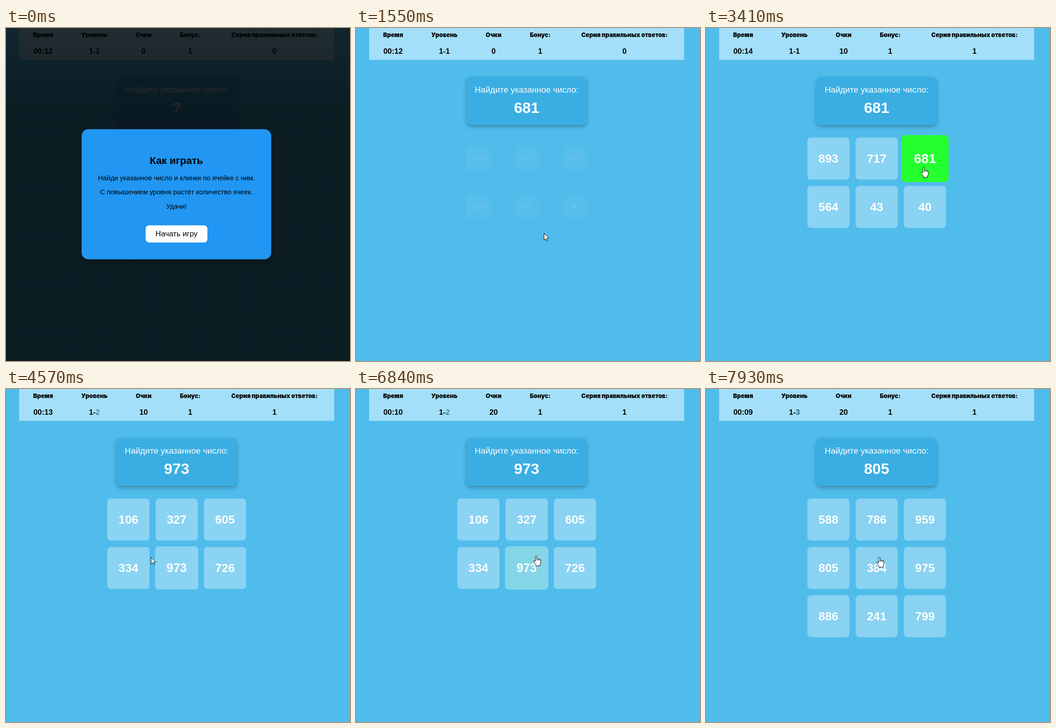
Write an HTML page that moves like this. It is 760 px wide and 737 px high and loops after 8 s.

```html
<!DOCTYPE html>
<html lang="ru">
<head>
<meta charset="utf-8">
<title>Найди число</title>
<style>
  html, body { margin: 0; width: 100%; height: 100%; overflow: hidden; background: #50bceb; }
  svg { display: block; width: 760px; height: 737px; cursor: default; }
  text { font-family: "Liberation Sans", Arial, sans-serif; text-anchor: middle; }
  .b { font-weight: bold; }
  .head { font: 900 13.07px Inter, sans-serif; }
  .value { font-size: 16.8px; }
  .tile { font-size: 26.13px; fill: #fff; }
  .card { filter: drop-shadow(0 4px 5px rgba(0, 0, 0, .28)); }
</style>
</head>
<body>
<svg id="stage" viewBox="0 0 760 737">
  <defs>
    <linearGradient id="shade" x2="0" y2="1">
      <stop offset="0" stop-opacity=".8"/>
      <stop offset=".25" stop-opacity=".85"/>
    </linearGradient>
  </defs>
  <rect width="760" height="737" fill="#50bceb"/>
  <rect x="29" width="696" height="70.5" fill="#a3dff9"/>
  <g id="stats"></g>
  <rect class="card" x="244" y="108" width="265.5" height="106.5" rx="11" fill="#3aaee2"/>
  <text x="376.9" y="143" font-size="18.67" fill="#fff">Найдите указанное число:</text>
  <text id="goal" class="b" x="376.9" y="188" font-size="33.6" fill="#fff"></text>
  <g id="board"></g>
  <g id="modal">
    <rect width="760" height="737" fill="url(#shade)"/>
    <rect class="card" x="167" y="224" width="419" height="288" rx="15" fill="#2196f3"/>
    <text class="b" x="376.5" y="300.5" font-size="22.4">Как играть</text>
    <g font-size="14.93">
      <text x="376.5" y="336.5">Найди указанное число и клинки по ячейке с ним.</text>
      <text x="376.5" y="368">С повышением уровня растёт количество ячеек.</text>
      <text x="376.5" y="399.5">Удачи!</text>
    </g>
    <rect id="button" x="308.5" y="436.7" width="136.5" height="38" rx="7.5" fill="#fff"/>
    <text x="376.8" y="461" font-size="16.8">Начать игру</text>
  </g>
  <g id="cursor" fill="#fff" stroke="#000" stroke-linejoin="round">
    <path id="arrow" d="M.5.5V15.6L4 12.3 6.4 17.6 8.6 16.6 6.3 11.4H10.9Z"/>
    <path id="hand" d="M-1.6 1.8a1.6 1.6 0 0 1 3.2 0V7q1.6-1 3 .4q1.6-.8 2.9.6q2.6-.3 2.6 2V15q0 2.4-1.7 4.2V22.4H-.8V20L-5.4 13.6q-1.2-2.4.8-2.8q1.4 0 3 2.2ZM1.6 7v3.6M4.6 7.4v3.2M7.5 8v2.8"/>
  </g>
</svg>
<script>
const LOOP = 8000, APPEAR = 300, PULSE = 500, HOVER_FADE = 150;
const SVG = 'http://www.w3.org/2000/svg';
const $ = id => document.getElementById(id);

const BASE = [138, 211, 243], GREEN = [38, 255, 47], RED = [255, 58, 52];
const miss = { tile: 5, at: 5450, select: 5560, fade: 5960, clear: 6720 };
const rounds = [
  { start: 1485, click: 2990, answer: 2, ink: '#000', nums: [893, 717, 681, 564, 43, 40] },
  { start: 3840, click: 6805, answer: 4, ink: '#3f87a3', nums: [106, 327, 605, 334, 973, 726] },
  { start: 7645, click: 1e9, answer: 3, ink: '#2b6072', nums: [588, 786, 959, 805, 384, 975, 886, 241, 799] }
];

// time, x, y of the pointer tip
const path = [
  [450, 702, 720], [1150, 415, 454], [1550, 415, 454], [1800, 411, 449], [2340, 411, 449],
  [2850, 481, 308], [4050, 481, 308], [4580, 320, 372], [4830, 320, 372],
  [5400, 459, 357], [5960, 459, 357], [6030, 456, 355], [6600, 398, 369],
  [6860, 398, 369], [7200, 383, 372]
];

const clamp = v => Math.max(0, Math.min(1, v));
const ease = v => (v = clamp(v), v * v * (3 - 2 * v));
const lerp = (a, b, p) => a + (b - a) * p;
const mix = (a, b, p) => `rgb(${a.map((v, i) => Math.round(lerp(v, b[i], p)))})`;

function add(parent, tag, attrs, text) {
  const el = document.createElementNS(SVG, tag);
  for (const k in attrs) el.setAttribute(k, attrs[k]);
  if (text !== undefined) el.textContent = text;
  parent.append(el);
  return el;
}

const [time, level, score, , streak] = [
  ['Время', 82], ['Уровень', 195.3], ['Очки', 304], ['Бонус:', 407], ['Серия правильных ответов:', 593.2]
].map(([label, x]) => {
  add($('stats'), 'text', { class: 'head', x, y: 19.5 }, label);
  return add($('stats'), 'text', { class: 'b value', x, y: 57 }, 1);
});
level.textContent = '1-';
const stage = add(level, 'tspan', {});

for (const r of rounds) {
  r.group = add($('board'), 'g', {});
  r.tiles = r.nums.map((n, i) => {
    const x = 270.4 + i % 3 * 106.7, y = 289 + Math.floor(i / 3) * 107;
    const g = add(r.group, 'g', {});
    const box = add(g, 'rect', { x: -46.6, y: -46.6, width: 93.2, height: 93.2, rx: 8 });
    const mark = add(g, 'rect', { x: -21.8, y: -15, width: 43.6, height: 30, fill: '#2b47ae', visibility: 'hidden' });
    add(g, 'text', { class: 'b tile', y: 9 }, n);
    return { x, y, g, box, mark };
  });
  r.group.append(r.tiles[r.answer].g);
}

function pointer(t) {
  const i = path.findIndex(p => p[0] > t);
  if (i < 0) return path[path.length - 1].slice(1);
  if (i === 0) return path[0].slice(1);
  const [a, b] = [path[i - 1], path[i]], p = ease((t - a[0]) / (b[0] - a[0]));
  return [lerp(a[1], b[1], p), lerp(a[2], b[2], p)];
}

const over = (tile, t) => {
  const [x, y] = pointer(t);
  return Math.abs(x - tile.x) < 46.6 && Math.abs(y - tile.y) < 46.6;
};
const overButton = t => {
  const [x, y] = pointer(t);
  return t > 450 && t < 1280 && x > 308 && x < 445 && y > 437 && y < 475;
};

// share of the recent past spent under the pointer
function hover(r, tile, t) {
  let sum = 0;
  for (let i = 0; i < 10; i++) {
    const s = t - i * HOVER_FADE / 10;
    if (s > r.start + APPEAR && over(tile, s)) sum++;
  }
  return sum / 10;
}

function drawTile(r, i, t) {
  const tile = r.tiles[i], shown = ease((t - r.start) / APPEAR);
  let scale = (0.5 + 0.5 * shown) * (1 + 0.05 * hover(r, tile, t)), fill = mix(BASE, BASE, 0);
  if (i === r.answer && t >= r.click) {
    const p = (t - r.click) / PULSE;
    scale = 1 + 0.5 * ease(p < 0.5 ? p * 2 : 2 - p * 2);
    fill = mix(BASE, GREEN, ease(p * 2));
  }
  if (r === rounds[1] && i === miss.tile) {
    fill = mix(BASE, RED, ease((t - miss.at) / 150) * (1 - ease((t - miss.fade) / 170)));
    tile.mark.setAttribute('visibility', t >= miss.select && t < miss.clear ? 'visible' : 'hidden');
  }
  tile.g.setAttribute('transform', `translate(${tile.x} ${tile.y}) scale(${scale})`);
  tile.g.setAttribute('opacity', shown);
  tile.box.setAttribute('fill', fill);
}

function draw(t) {
  const now = rounds.filter(r => t >= r.start).length - 1;
  const round = rounds[Math.max(0, now)];
  rounds.forEach((r, i) => r.group.setAttribute('display', i === now ? 'inline' : 'none'));
  if (now >= 0) round.tiles.forEach((_, i) => drawTile(round, i, t));

  const left = t < 1690 ? 12 : 16 - Math.floor((t - 690) / 1000);
  time.textContent = '00:' + String(left).padStart(2, '0');
  stage.textContent = Math.max(0, now) + 1;
  stage.setAttribute('fill', round.ink);
  score.textContent = rounds.filter(r => t >= r.click).length * 10;
  streak.textContent = +(t >= rounds[0].click && (t < miss.at || t >= rounds[1].click));
  $('goal').textContent = t < 1280 ? '?' : round.nums[round.answer];

  const gone = ease((t - 1265) / 260);
  $('modal').setAttribute('opacity', 1 - gone);
  $('modal').setAttribute('display', gone < 1 ? 'inline' : 'none');
  $('button').setAttribute('fill', overButton(t) ? '#e6f3fd' : '#fff');

  const [x, y] = pointer(t);
  const hand = overButton(t) || now >= 0 && round.tiles.some(tile => over(tile, t));
  $('cursor').setAttribute('transform', `translate(${x} ${y})`);
  $('cursor').setAttribute('display', t < 450 ? 'none' : 'inline');
  $('arrow').setAttribute('display', hand ? 'none' : 'inline');
  $('hand').setAttribute('display', hand ? 'inline' : 'none');
}

const begin = performance.now();
function tick() {
  draw((performance.now() - begin) % LOOP);
  requestAnimationFrame(tick);
}
tick();
</script>
</body>
</html>
```
